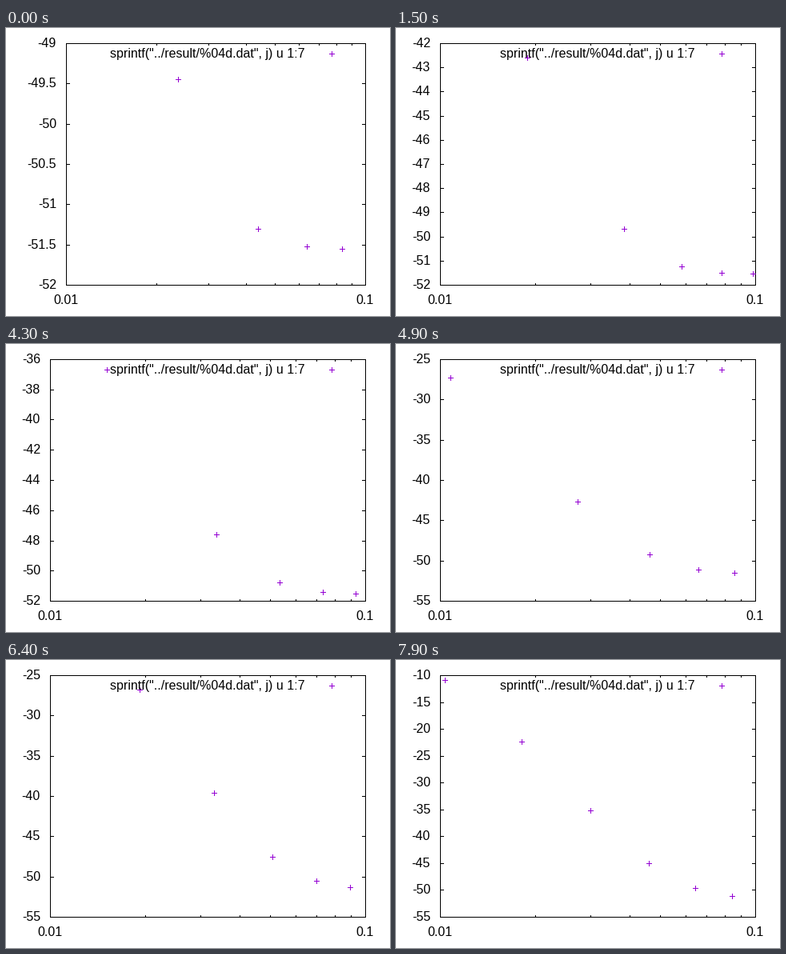
Recreate the animation shown at these times as a matplotlib script. Size 480 by 360 pixels, loop 8 s.

```python
import math

import matplotlib.pyplot as plt
import numpy as np
from matplotlib.animation import FuncAnimation
from matplotlib.collections import LineCollection

W, H, DPI = 480, 360, 100
FRAMES, STEP_MS = 80, 100
PX = 72 / DPI
RIGHT, TOP, BOTTOM = 449, 19, 321
X_MIN, X_MAX = 0.01, 0.1
PURPLE = "#9400d3"
TITLE = 'sprintf("../result/%04d.dat", j) u 1:7'
FAR, GAP = -51.55, 0.02

plt.rcParams["font.family"] = "Liberation Sans"
plt.rcParams["font.size"] = 16 * PX

# Key times, drift of the evenly spaced far particles, steepness of the profile
TIME = np.array([0, 15, 35, 49, 54, 64, 71, 79], float)
DRIFT = np.array([.1037, .0983, .0980, .0859, .0727, .0497, .0402, .0241])
STEEP = np.array([86.7, 62.7, 61.3, 49.7, 42.3, 37, 35.6, 34.3])


def smooth(t, values):
    """Monotone cubic through the key values."""
    h = np.diff(TIME)
    d = np.diff(values) / h
    w1, w2 = 2 * h[1:] + h[:-1], h[1:] + 2 * h[:-1]
    inner = (w1 + w2) / (w1 / d[:-1] + w2 / d[1:])
    m = np.concatenate([[1.4 * d[0]], inner, [d[-1]]])
    i = min(np.searchsorted(TIME, t, side="right") - 1, len(h) - 1)
    u = (t - TIME[i]) / h[i]
    return (values[i] + (values[i + 1] - values[i]) * u * u * (3 - 2 * u)
            + h[i] * u * (1 - u) * ((1 - u) * m[i] - u * m[i + 1]))


def particles(t):
    """Visible particles: drifting in from the right, squeezed where y rises."""
    drift, b = smooth(t, DRIFT), smooth(t, STEEP)
    squeeze = max(0, .0298 - .0004 * b)

    def rise(x):
        return np.exp(4.83 - .0215 * b - b * x - 300 * x * x)

    grid = np.linspace(X_MIN, X_MAX, 2000)
    rest = grid + np.log(1 - squeeze * rise(grid)) / (b + 600 * grid)
    q = drift + GAP * np.arange(-6, 6)
    q = q[(q >= rest[0]) & (q <= rest[-1])]
    x = np.interp(q, rest, grid)
    return x, FAR + rise(x)


def tic_step(span):
    power = 10 ** math.floor(math.log10(span))
    norm = span / power
    return power * (0.2 if norm < 2 else 0.5 if norm < 5 else 1)


def cross(x, y):
    x, y = round(x), round(y)
    return [[(x - 3, y + .5), (x + 4, y + .5)],
            [(x + .5, y - 3), (x + .5, y + 4)]]


def tics(left, y_tics):
    lines = []
    for y in y_tics:
        y = round(y) + .5
        lines += [[(left, y), (left + 5, y)], [(RIGHT - 4, y), (RIGHT + 1, y)]]
    for n in range(2, 10):
        x = round(left + (RIGHT - left) * math.log10(n)) + .5
        lines += [[(x, TOP), (x, TOP + 3)], [(x, BOTTOM - 2), (x, BOTTOM + 1)]]
    return lines


fig = plt.figure(figsize=(W / DPI, H / DPI), dpi=DPI, facecolor="white")
ax = fig.add_axes([0, 0, 1, 1])


def strokes(lines, color):
    ax.add_collection(LineCollection(lines, colors=color, linewidths=PX,
                                     capstyle="butt", snap=False))


def draw(i):
    ax.clear()
    ax.set(xlim=(0, W), ylim=(H, 0))
    ax.axis("off")

    x, y = particles(i)
    step = tic_step(y.max() - y.min())
    lo = math.floor(y.min() / step) * step
    hi = math.ceil(y.max() / step) * step
    marks = lo + step * np.arange(round((hi - lo) / step) + 1)
    left = 75 if step < 1 else 55

    def to_y(v):
        return BOTTOM - (v - lo) / (hi - lo) * (BOTTOM - TOP)

    l, r, top, bot = left + .5, RIGHT + .5, TOP + .5, BOTTOM + .5
    frame = [[(left, top), (RIGHT + 1, top)], [(left, bot), (RIGHT + 1, bot)],
             [(l, TOP), (l, BOTTOM + 1)], [(r, TOP), (r, BOTTOM + 1)]]
    strokes(frame + tics(left, [to_y(v) for v in marks]), "black")

    for v in marks:
        ax.text(left - 12, round(to_y(v)) + 5, f"{v:g}", ha="right", va="baseline")
    for pos, label in [(left, "0.01"), (RIGHT, "0.1")]:
        ax.text(pos - .5, 345, label, ha="center", va="baseline")
    ax.text(373, 37, TITLE, ha="right", va="baseline")

    px = left + (RIGHT - left) * np.log10(x / X_MIN)
    points = cross(407, 32)
    for a, b in zip(px, to_y(y)):
        points += cross(a, b)
    strokes(points, PURPLE)
    return []


anim = FuncAnimation(fig, draw, frames=FRAMES, interval=STEP_MS,
                     repeat=True, repeat_delay=0, init_func=lambda: [])
plt.show()
```
